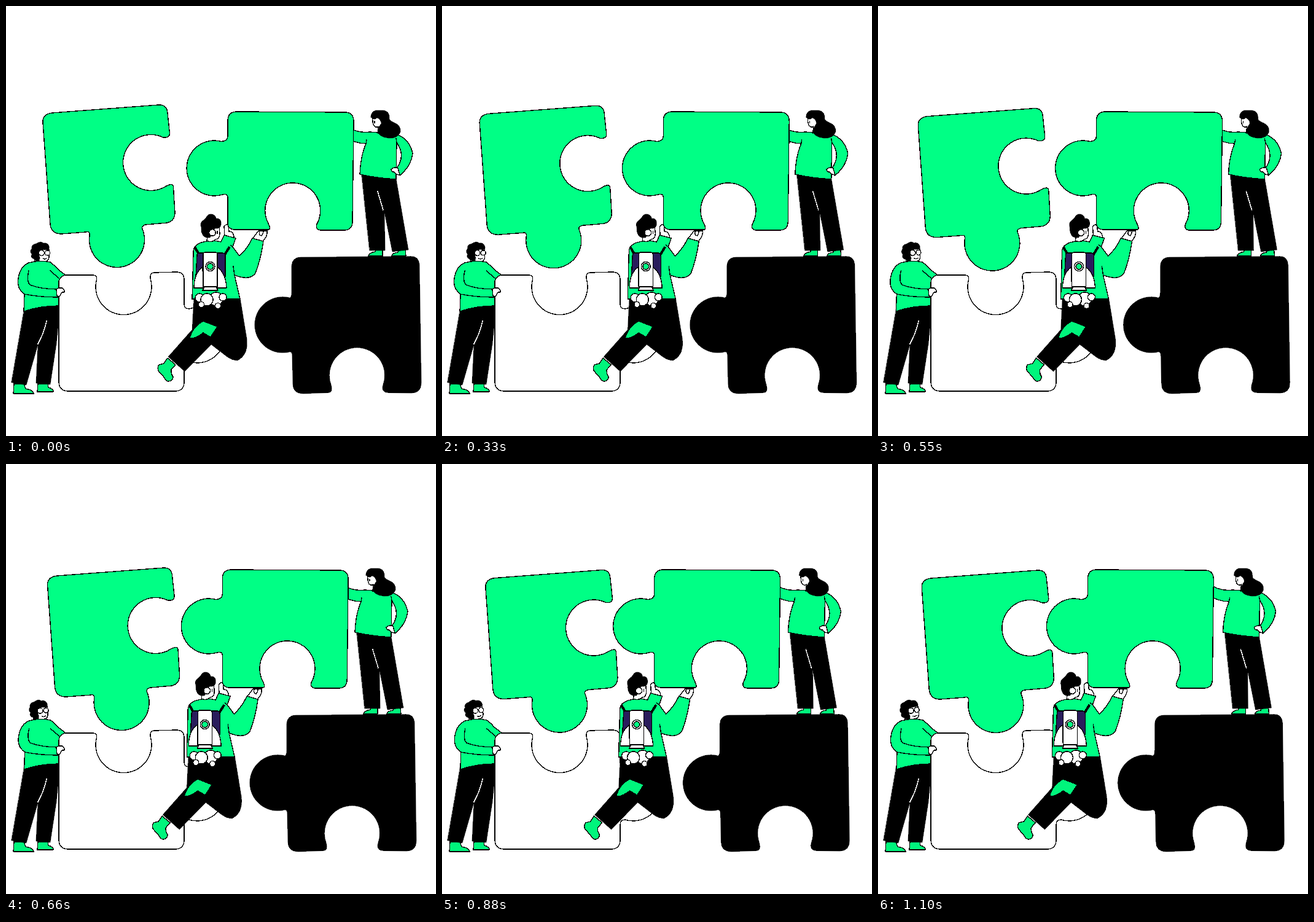
Animation of 700x700 px, one loop 1210 ms. Source, as an HTML page:

```html
<!DOCTYPE html>
<html lang="en">
<head>
<meta charset="utf-8">
<title>Puzzle team</title>
<style>
  html, body { margin: 0; width: 100%; height: 100%; overflow: hidden; background: #fff; }
  svg { display: block; width: 100%; height: 100%; shape-rendering: crispEdges; }
  path, circle { stroke: #000; stroke-width: 1.4; stroke-linejoin: round; stroke-linecap: round; }
  .green { fill: #00ff85; }
  .shoe { fill: #00f57c; }
  .white { fill: #fff; }
  .black { fill: #000; stroke-width: .6; }
  .navy { fill: #2a1c5c; }
  .line { fill: none; }
  .crease { fill: none; stroke: #fff; stroke-width: 1.5; }
  .strap { fill: none; stroke-width: 4; stroke-linecap: butt; }
</style>
</head>
<body>
<svg viewBox="0 0 700 700">
  <!-- man with glasses -->
  <path class="shoe" d="M13 615L12 631H45C45 626 38 624 32 623L29 615Z"/>
  <path class="shoe" d="M52 615L51 628H77C78 625 73 622 69 621L68 615Z"/>
  <path class="black" d="M30 492L86 487Q86 520 82 550L72 616L49 614L52 551L33 617L9 613Z"/>
  <path class="crease" d="M66 513Q62 532 52 550"/>
  <g id="manHead">
    <path class="white" d="M46 408L47 421L61 421V416Q70 417 70 407V396L55 391Z"/>
    <path class="black" d="M54 415Q50 418 46 412Q39 410 42 404Q38 399 42 395Q41 388 49 387Q56 382 61 386Q68 385 70 391Q72 397 66 397Q58 395 55 401Q53 404 55 410Z"/>
    <circle class="white" cx="58" cy="402" r="4.4"/>
    <circle class="white" cx="67.5" cy="402" r="4"/>
    <path class="line" d="M60 411Q63 413 66 411"/>
  </g>
  <g id="manTop">
    <path class="green" d="M29 497L30 469Q17 460 20 443Q23 424 37 418Q55 413 72 417Q79 422 85 429L98 439L86 447V488Q56 488 29 497Z"/>
    <path class="line" d="M30 469Q54 474 84 474M37 431Q33 448 39 454Q57 461 85 461M72 431L86 443"/>
  </g>

  <!-- white piece -->
  <path class="white" d="M86 452Q86 438 100 438H142Q149 438 147.500 445.500A45.500 45.500 0 1 0 235.500 445.500Q233 434 242 434L277 433Q290 433 290 446V486Q290 493 298 493A45 45 0 1 1 298 579Q290 579 290 587V612Q290 627 275 627H102Q86 627 86 611Z"/>
  <path class="white" d="M82 462Q84 458 91 459Q96 461 95 466Q90 465 89 470Q87 475 83 472Z"/>

  <!-- left piece -->
  <path id="leftPiece" class="green" d="M75 174L248 161Q262 160 263 174L266.500 207Q267 215 256 214A45.500 45.500 0 1 0 261 293Q272 287 272.500 295L275 336Q275 350 262 353L227 356Q220 358 222 363A45 45 0 1 1 136 374Q137 366 130 368L90 371Q74 371 72 356L60 190Q59 176 75 174Z"/>

  <!-- black piece and the woman on it -->
  <g id="stand">
    <path class="black" d="M465 423Q466 409 480 409L658 407.500Q672 407 673 421L676 613Q676 630 660 630L622 629.500Q610 629 614 616A45 45 0 1 0 529 616Q533 630 524 629.500L484 631Q467 631 467 615L466 570Q466 563 462 563A45.500 45.500 0 1 1 462 475Q465 474 465 466Z"/>
    <path class="shoe" d="M590 407Q591 402 601 400L602 396H613V407Z"/>
    <path class="shoe" d="M628 407Q629 402 638 401L639 396H650L651 407Z"/>
    <path class="black" d="M579 274L635 281L655 397L629 400L616 335L617 398L592 398Z"/>
    <path class="crease" d="M605 302L614 332"/>
    <path class="green" d="M550 193Q570 208 592 205L634 208Q657 216 662 240Q660 260 641 276L636 264Q651 244 636 222L635 282Q602 280 576 274Q577 245 586 224Q568 224 550 212Z"/>
    <path class="line" d="M586 224L587 218M636 222L635 216"/>
    <path class="white" d="M641 275L638 264Q632 261 627 266Q628 271 632 270Q635 275 641 275Z"/>
    <path class="white" d="M597 180Q596 190 599 195Q603 199 606 196L605 207L617 202L612 178Z"/>
    <path class="black" d="M594 181Q594 172 602 170H614Q625 171 624 184Q625 187 632 190Q643 194 642 205Q638 216 623 215Q606 213 605 203Q607 196 611 191Q610 184 604 182Q599 187 594 181Z"/>
    <path class="line" d="M600 188V190"/>
  </g>

  <!-- carried piece and the jumper -->
  <g id="carry">
    <path class="green" d="M376 172L552 173Q566 173 566 188L564 351Q564 365 550 365H512Q503 364 506 355A45 45 0 1 0 427 354Q432 364 427 364H373Q361 364 361 353V311Q361 305 352.500 307A45 45 0 1 1 350.500 220.500Q361 220 361 212V187Q361 172 376 172Z"/>

    <path class="shoe" d="M263 573L276 584L269 592Q268 598 272 604Q271 611 264 611Q260 610 257 604L248 594Q246 588 249 584L257 582Z"/>
    <path class="black" d="M306 475L381 475L392 542Q395 568 377 577Q368 577 360 571L334 551L291 595L264 571L303 527Z"/>
    <path class="shoe" d="M299 541Q304 522 321 513L344 522L333 539L321 532Q308 542 299 541Z"/>

    <path class="white" d="M401 379L411 366H425Q426 375 418 383Z"/>
    <path class="line" d="M413 366Q411 374 416 374Q419 371 419 365"/>
    <path class="white" d="M356 375L355 359Q360 353 362 358L363 367Q370 366 372 379Z"/>
    <path class="green" d="M303 477L305 402Q304 390 318 385Q334 380 350 384L355 373L374 378L369 392L380 407Q393 395 401 378L419 383Q415 412 406 435Q397 448 372 438L381 477Z"/>
    <path class="line" d="M372 438L370 424M369 392L365 389"/>

    <path class="white" d="M328 372L327 382Q335 386 341 380Q348 380 348 370L347 358H333Z"/>
    <path class="black" d="M332 377Q325 378 321 374Q317 368 318 361Q315 353 321 349Q324 347 326 344Q329 338 335 339Q341 340 342 346Q349 345 350 352Q351 361 344 362Q338 361 337 367Z"/>
    <circle class="white" cx="336" cy="369" r="5.3"/>
    <path class="line" d="M344 367V370"/>

    <path class="strap" d="M307 392L314 404M364 392L356 405"/>
    <path class="navy" d="M311 405Q311 402 315 402H352Q357 402 357 407V440H309Z"/>
    <path class="white" d="M320 425Q306 435 306 459H321ZM344 425Q358 435 359 459H343Z"/>
    <path class="white" d="M321 404Q321 401 325 401H340Q344 401 344 404V457H321Z"/>
    <path class="white" d="M323 457H342L345 463H320Z"/>
    <circle class="white" cx="332.5" cy="424" r="7.5"/>
    <circle class="green" cx="332.5" cy="424" r="5"/>
    <g class="white">
      <circle cx="315" cy="475" r="7"/>
      <circle cx="342" cy="477" r="11"/>
      <circle cx="327" cy="478" r="10"/>
      <circle cx="353" cy="474" r="6"/>
      <circle cx="318" cy="486" r="4.5"/>
      <circle cx="345" cy="488" r="4.5"/>
    </g>
  </g>
</svg>
<script>
  const STEP = 110, COUNT = 11;
  const $ = id => document.getElementById(id);

  // Smooth ramp from 0 to 1 between two step positions
  function ramp(n, from, to) {
    const u = Math.min(1, Math.max(0, (n - from) / (to - from)));
    return u * u * (3 - 2 * u);
  }

  const move = (id, x, y = 0) => $(id).setAttribute('transform', `translate(${x} ${y})`);

  function draw(now) {
    const n = Math.floor(now / STEP) % COUNT;
    const left = ramp(n, 1.5, 8.8);
    const stand = ramp(n, 1.5, 9.9);
    const carry = ramp(n, 2, 10.7);
    move('leftPiece', 11.3 * left, 12 * left);
    move('stand', -14.5 * stand);
    move('carry', -20 * carry);
    move('manTop', stand);
    $('manHead').setAttribute('transform', `translate(${-2 * stand} 0) rotate(${-8 * stand} 54 418)`);
  }

  const start = performance.now();
  function tick() {
    draw(performance.now() - start);
    requestAnimationFrame(tick);
  }
  tick();
</script>
</body>
</html>
```
